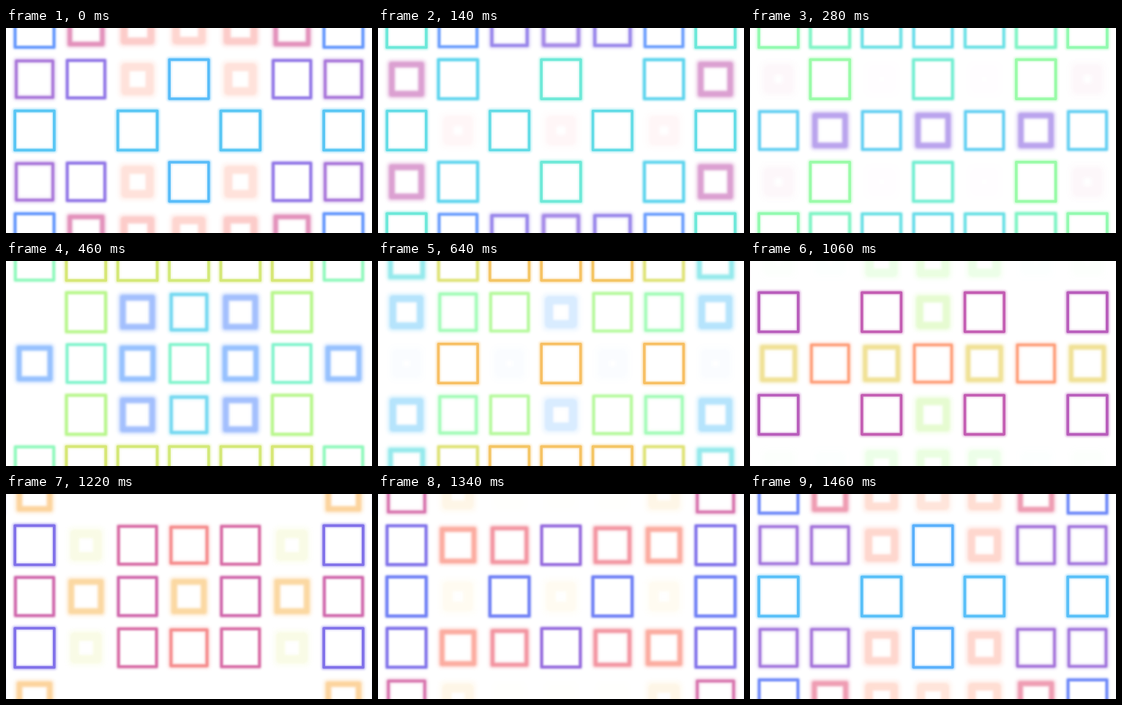
Recreate the animation shown at these times as an HTML page with a canvas. Size 500x281 px, loop 1480 ms.

```html
<!DOCTYPE html>
<html lang="en">
<head>
<meta charset="utf-8">
<title>Pulsing squares</title>
<style>
html, body { margin: 0; width: 100%; height: 100%; overflow: hidden; background: #fff; }
canvas { display: block; width: 500px; height: 281px; }
</style>
</head>
<body>
<canvas id="stage" width="500" height="281"></canvas>
<script>
const ctx = document.getElementById('stage').getContext('2d');
const LOOP = 1480, PITCH = 70.33, TURN = Math.PI * 2;

// Turn at which a cell peaks, by row and column away from the centre.
const peakOf = [
  x => 0.505 + 0.5 * x,
  x => 0.064 + 0.57 * x,
  x => 0.355 - 0.008 * x ** 3
];

// Soft rainbow: one cosine per channel.
function rainbow(deg) {
  const channel = (mid, amp, shift) => Math.round(mid + amp * Math.cos((deg - shift) / 360 * TURN));
  return `rgb(${channel(160, 95, 15)}, ${channel(160, 90, 115)}, ${channel(165, 88, 212)})`;
}

// Square frame between two edge lengths.
function ring(x, y, inner, outer, blur, alpha) {
  const size = (inner + outer) / 2;
  ctx.filter = `blur(${blur}px)`;
  ctx.globalAlpha = alpha;
  ctx.lineWidth = (outer - inner) / 2;
  ctx.strokeRect(x - size / 2, y - size / 2, size, size);
}

function drawCell(col, row, turn) {
  const wave = Math.cos((turn - peakOf[Math.abs(row)](Math.abs(col))) * TURN);
  const level = (1 + wave) / 2, fade = 1 - level;
  const alpha = (1 - fade * fade) * Math.min(1, level / 0.27);
  if (alpha < 0.004) return;

  const hole = 50 - 48 * fade ** 3;
  const outer = 60.5 - 9 * fade;
  const core = hole + (outer - hole) * 0.72;
  const x = 250 + col * PITCH, y = 140.5 + row * PITCH;

  ctx.strokeStyle = rainbow(290 - 105 * wave - 360 * turn);
  ring(x, y, hole - 1, outer, 1.5 + fade, alpha * 0.42);
  ring(x, y, hole, core, 0.7 + 1.2 * fade, alpha * 0.8);
}

function draw() {
  const turn = performance.now() / LOOP % 1;
  ctx.filter = 'none';
  ctx.globalAlpha = 1;
  ctx.fillStyle = '#fff';
  ctx.fillRect(0, 0, 500, 281);
  ctx.lineJoin = 'round';
  for (let row = -2; row <= 2; row++)
    for (let col = -4; col <= 4; col++) drawCell(col, row, turn);
  requestAnimationFrame(draw);
}
draw();
</script>
</body>
</html>
```
